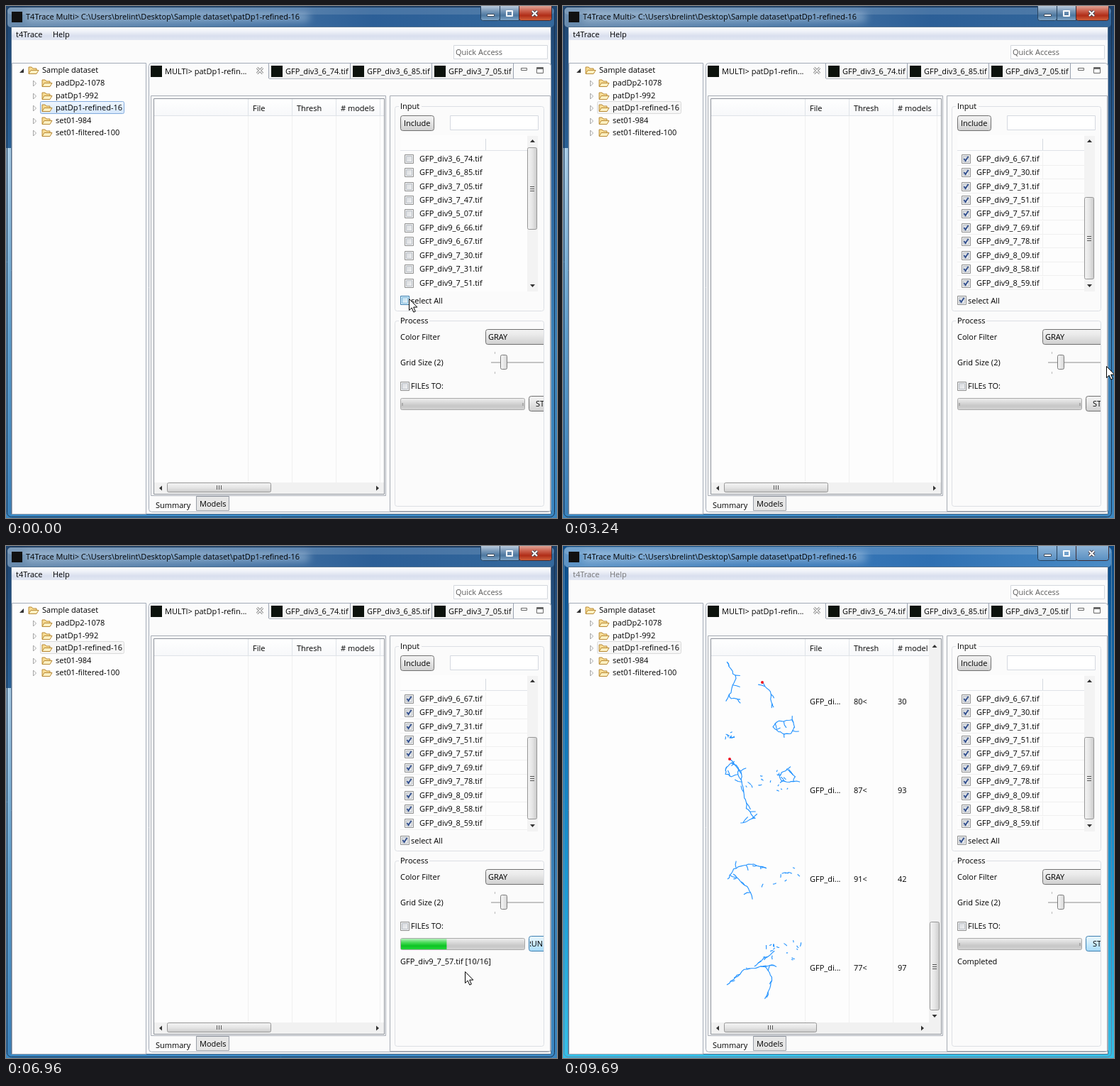
Recreate the animation shown at these times as an HTML page with a canvas. Size 777 px wide and 721 px high, loop 9720 ms.

```html
<!DOCTYPE html>
<html lang="en">
<head>
<meta charset="utf-8">
<title>T4Trace Multi</title>
<style>
html, body { margin: 0; width: 100%; height: 100%; overflow: hidden; background: #fbfbfb; }
canvas { display: block; }
</style>
</head>
<body>
<canvas id="stage" width="777" height="721"></canvas>
<script>
const c = document.getElementById('stage').getContext('2d');
const LOOP = 9720, STEP = 133;
const FONT = '11px "Open Sans", "Noto Sans", sans-serif';
const BLUE = '#1e90ff';

// Moments of the story, in ms
const SELECT = 420, DRAG = 1320, DROP = 1800, HOVER_START = 5150, RUN = 5440, DONE = 7200,
  FILL = 7350, WHEEL = 8430, IDLE = 9690;

// Pointer stops: time, x, y
const stops = [[0, 568, 412], [SELECT, 568, 412], [1330, 747, 281], [1590, 753, 340], [1890, 753, 340],
  [2390, 706, 469], [2820, 764, 480], [3240, 766, 510], [4220, 592, 546], [4500, 592, 546],
  [5290, 755, 560], [6290, 740, 580], [6910, 647, 599], [7780, 633, 600], [8370, 449, 370], [LOOP, 449, 370]];

const files = '3_6_74 3_6_85 3_7_05 3_7_47 9_5_07 9_6_66 9_6_67 9_7_30 9_7_31 9_7_51 9_7_57 9_7_69 9_7_78 9_8_09 9_8_58 9_8_59'
  .split(' ').map(s => `GFP_div${s}.tif`);

// Key points of the traced cells; knots and specks are x, y, radius
const traces = {
  3: { thresh: 74, models: 8, strands: ['43,78 30,52 16,46', '43,78 61,84 93,97'], knots: [[69, 42, 8]], dot: true },
  4: { thresh: 77, models: 7, strands: ['58,41 68,60 77,79 88,84'], knots: [[61, 66, 9]] },
  5: { thresh: 75, models: 54, strands: ['106,20 112,43 102,64 87,67', '15,53 36,62 72,54'], knots: [[48, 67, 13]], specks: [30, 12, 28] },
  6: { thresh: 74, models: 115, strands: ['90,64 117,69', '90,64 61,70 36,86 11,88', '90,64 75,56 79,30'], knots: [[56, 50, 18]], specks: [78, 108, 28], dot: true },
  12: { thresh: 80, models: 30, strands: ['17,7 30,30 20,57 35,61', '67,36 78,49 81,73'], knots: [[98, 99, 14]], specks: [21, 110, 7], dot: true },
  13: { thresh: 87, models: 93, strands: ['21,19 36,36 45,88 56,102 36,110'], knots: [[24, 34, 10], [102, 44, 11]], specks: [74, 50, 30], dot: true },
  14: { thresh: 91, models: 42, strands: ['18,62 26,48 48,40 74,46', '26,55 48,76 54,91'], specks: [92, 58, 28] },
  15: { thresh: 77, models: 97, strands: ['17,86 41,65 71,59 88,60', '71,60 81,76 74,103', '56,60 84,38'], specks: [96, 38, 26] }
};

function random(seed) {
  let s = seed * 7919 + 17;
  return () => (s = (s * 16807) % 2147483647) / 2147483647;
}

const clamp = (v, lo, hi) => Math.max(lo, Math.min(hi, v));

function rect(x, y, w, h, fill, stroke, r = 0) {
  const inset = stroke ? .5 : 0;
  c.beginPath();
  c.roundRect(x + inset, y + inset, w - 2 * inset, h - 2 * inset, r);
  if (fill) { c.fillStyle = fill; c.fill(); }
  if (stroke) { c.strokeStyle = stroke; c.lineWidth = 1; c.stroke(); }
}

function shade(x0, y0, x1, y1, ...colors) {
  const g = c.createLinearGradient(x0, y0, x1, y1);
  colors.forEach((s, i) => g.addColorStop(i / (colors.length - 1), s));
  return g;
}
const down = (y, h, ...colors) => shade(0, y, 0, y + h, ...colors);
const across = (x, w, ...colors) => shade(x, 0, x + w, 0, ...colors);

function text(s, x, mid, color = '#000') {
  c.fillStyle = color;
  c.fillText(s, x, mid + 4);
}

function clip(x, y, w, h, draw) {
  c.save();
  c.beginPath();
  c.rect(x, y, w, h);
  c.clip();
  draw();
  c.restore();
}

function poly(points, fill, stroke, width = 1) {
  c.beginPath();
  points.forEach(([x, y], i) => i ? c.lineTo(x, y) : c.moveTo(x, y));
  if (fill) { c.closePath(); c.fillStyle = fill; c.fill(); }
  if (stroke) { c.strokeStyle = stroke; c.lineWidth = width; c.stroke(); }
}

function disc(x, y, r, fill, stroke) {
  c.beginPath();
  c.arc(x, y, r, 0, 7);
  if (fill) { c.fillStyle = fill; c.fill(); }
  if (stroke) { c.strokeStyle = stroke; c.lineWidth = 1; c.stroke(); }
}

function cross(x, y, size, outline, fill, width) {
  for (const [w, color] of [[width + 2, outline], [width, fill]]) {
    poly([[x, y], [x + size, y + size]], null, color, w);
    poly([[x + size, y], [x, y + size]], null, color, w);
  }
}

function arrow(x, y, dx, dy) {
  poly([[x + dx * 2, y + dy * 2], [x - dx * 2 + dy * 3.5, y - dy * 2 + dx * 3.5],
    [x - dx * 2 - dy * 3.5, y - dy * 2 - dx * 3.5]], '#333');
}

function button(x, y, w, h, hot) {
  const fill = hot ? down(y, h, '#eaf6fd', '#d9f0fc', '#bee6fd', '#a7d9f5')
    : down(y, h, '#f3f3f3', '#ebebeb', '#dddddd', '#cfcfcf');
  rect(x, y, w, h, fill, hot ? '#3c7fb1' : '#707070', 3);
}

function checkbox(x, mid, checked, hot) {
  const y = Math.round(mid - 6.5);
  rect(x, y, 13, 13, hot ? '#def2fb' : '#f4f4f4', hot ? '#3c7fb1' : '#8e8f8f');
  rect(x + 2, y + 2, 9, 9, shade(x, y, x + 12, y + 12, hot ? '#a9d8f2' : '#cfd3d8', '#f6f6f6'), hot ? '#7fb9dc' : '#b9bfc6');
  if (checked) poly([[x + 3.5, y + 6], [x + 5.5, y + 9], [x + 9.5, y + 3]], null, '#33508e', 2);
}

const GRAY = ['#f5f5f5', '#e6e6e6', '#c9c9c9'], AQUA = ['#cdeafb', '#9bd7f8', '#5fbdec'];

function vThumb(x, y, h, hot) {
  rect(x, y, 14, h, across(x, 14, ...(hot ? AQUA : GRAY)), hot ? '#3c7fb1' : '#979797', 2);
  for (let i = -1; i < 2; i++) rect(x + 4, Math.round(y + h / 2) + i * 3, 6, 1, '#555');
}

function hThumb(x, y, w) {
  rect(x, y, w, 14, down(y, 14, ...GRAY), '#979797', 2);
  for (let i = -1; i < 2; i++) rect(Math.round(x + w / 2) + i * 3 - 1, y + 4, 1, 6, '#555');
}

function group(label, y, h, w) {
  rect(548, y, 211, h, null, '#dcdfe4', 3);
  rect(554, y - 2, w, 5, '#fbfbfb');
  text(label, 556, y);
}

function drawFrame(idle) {
  rect(0, 0, 777, 721, idle ? down(0, 721, '#0c4a86', '#1272b4', '#1c9ad4', '#36bfe6')
    : down(0, 721, '#1d436e', '#2c659c', '#3c83ba', '#3a86c0'));
  if (!idle) rect(0, 200, 7, 515, down(200, 515, '#a9cbe4', '#5f9dca', '#3a7fb8'));
  rect(1, 1, 773, 719, null, idle ? '#5f87a8' : '#1b3350', 6);
  rect(2, 2, 771, 28, idle ? across(0, 777, '#5f95c6', '#3f7dba', '#2f70b2', '#4a8cc6')
    : across(0, 777, '#6a8cae', '#4f7ba8', '#2c5f97', '#34689c'), null, 5);
  rect(2, 2, 771, 10, 'rgba(255,255,255,.13)', null, 5);
  c.save();
  c.filter = 'blur(6px)';
  rect(26, 9, 402, 13, 'rgba(214,230,245,.45)', null, 6);
  c.restore();
  text('T4Trace Multi> C:\\Users\\brelint\\Desktop\\Sample dataset\\patDp1-refined-16', 28, 15);
  rect(8, 8, 15, 15, '#111');

  const glass = idle ? down(0, 20, '#8fb5d8', '#5a90c2') : down(0, 20, '#b9cbdd', '#7d9cbb', '#4c779f', '#7ea4c6');
  const red = down(0, 20, '#dfa295', '#cc6350', '#b02d17', '#d0603c');
  rect(669, -3, 28, 24, glass, '#27435f', 3);
  rect(696, -3, 28, 24, glass, '#27435f');
  rect(723, -3, 47, 24, idle ? glass : red, '#3f2e35', 3);
  rect(678, 11, 11, 4, '#fff', '#3c4a5c');
  rect(705, 6, 10, 9, null, '#fff');
  rect(706, 7, 8, 7, null, '#fff');
  cross(742, 7, 7, '#4b4550', '#fff', 2.2);

  rect(7, 29, 762, 687, '#fbfbfb', '#51708f');
  rect(8, 30, 760, 18, down(30, 18, '#fdfdfe', '#eef1f8', '#d9dfee', '#e2e7f3'));
  text('t4Trace', 14, 40, idle ? '#777' : '#000');
  text('Help', 66, 40, idle ? '#777' : '#000');
  rect(631, 55, 133, 20, '#fff', '#d3d7dd');
  text('Quick Access', 634, 65, '#5a5a5a');
}

function folder(x, y) {
  poly([[x + 1, y + 10], [x + 1, y + 1], [x + 5, y + 1], [x + 7, y + 3], [x + 12, y + 3], [x + 12, y + 10]], '#f7dc95', '#b98a35');
  poly([[x + 1, y + 10.5], [x + 4, y + 5.5], [x + 15, y + 5.5], [x + 12, y + 10.5], [x + 1, y + 10.5]], '#fdf0c2', '#b98a35');
}

function drawTree(focused) {
  rect(8, 80, 190, 636, '#fdfdfd', '#a3abb8');
  poly([[19, 94], [25, 94], [25, 88]], '#333');
  folder(31, 85);
  text('Sample dataset', 51, 90);
  ['padDp2-1078', 'patDp1-992', 'patDp1-refined-16', 'set01-984', 'set01-filtered-100'].forEach((s, i) => {
    const y = Math.round(108 + i * 17.5);
    if (i === 2) rect(48, 134, 119, 18, focused ? down(134, 18, '#f0f7fe', '#d4e6fb') : '#f6f6f6', focused ? '#84acdd' : '#dadada', 2);
    poly([[38.5, y - 3], [42.5, y + 1], [38.5, y + 5], [38.5, y - 3]], '#fff', '#a5a5a5');
    folder(50, y - 5);
    text(s, 70, y);
  });
}

function drawTabs() {
  rect(201, 80, 568, 633, '#fbfbfb', '#a3abb8', 4);
  rect(371, 81, 344, 21, down(81, 21, '#fdfdfd', '#f0f0f0'));
  rect(371, 102, 397, 1, '#b4bac4');
  ['MULTI> patDp1-refin...', ...files.slice(0, 3)].forEach((label, i) => {
    const x = i ? 259 + i * 115 : 204;
    rect(x, 84, 16, 16, '#0c120c');
    text(label, x + 20, 92);
    rect(370 + i * 115, 81, 1, 21, '#9aa2b0');
  });
  cross(354, 87, 8, '#8a8a8a', '#fff', 1.2);
  rect(726, 87, 9, 4, '#fff', '#666');
  rect(748, 86, 10, 9, '#fff', '#666');
  rect(748, 87, 10, 2, '#666');
}

// Wavy stroke through the points, with short side twigs
function neurite(points, rnd) {
  const line = [points[0]];
  for (let i = 1; i < points.length; i++) {
    const [ax, ay] = points[i - 1], [bx, by] = points[i];
    const n = Math.ceil(Math.hypot(bx - ax, by - ay) / 4);
    for (let k = 1; k <= n; k++) {
      line.push([ax + (bx - ax) * k / n + rnd() * 2 - 1, ay + (by - ay) * k / n + rnd() * 2 - 1]);
    }
  }
  poly(line, null, BLUE, 1.1);
  line.forEach(([x, y], i) => {
    if (i % 4 === 2) twig(x, y, 5 + rnd() * 6, rnd);
  });
}

function twig(x, y, length, rnd) {
  const a = rnd() * 6.28, b = a + rnd() - .5, h = length / 2;
  const mx = x + Math.cos(a) * h, my = y + Math.sin(a) * h;
  poly([[x, y], [mx, my], [mx + Math.cos(b) * h, my + Math.sin(b) * h]], null, BLUE, 1.1);
}

function knot([x, y, r], rnd) {
  const ring = Array.from({ length: 9 }, (_, i) => {
    const a = i % 8 * Math.PI / 4, d = r * (i % 8 ? .7 + rnd() * .5 : 1);
    return [x + Math.cos(a) * d, y + Math.sin(a) * d * .8];
  });
  neurite(ring, rnd);
}

const rowInfo = row => traces[row] || {
  thresh: 72 + row * 5 % 18, models: 9 + row * 23 % 80,
  strands: [`${15 + row * 3},30 45,60 ${60 + row * 4},95`], knots: [[80, 40, 10]], specks: [60, 60, 45]
};

function drawCell(row, x, y) {
  const { strands, knots = [], specks, models, dot } = rowInfo(row), rnd = random(row + 1);
  const lines = strands.map(s => s.split(' ').map(p => p.split(',').map(Number)));
  c.save();
  c.translate(x, y);
  lines.forEach(line => neurite(line, rnd));
  knots.forEach(k => knot(k, rnd));
  if (specks) {
    const [sx, sy, r] = specks;
    for (let i = 0; i < 4 + models / 8; i++) {
      twig(sx + (rnd() * 2 - 1) * r, sy + (rnd() - .5) * r, 2 + rnd() * 4, rnd);
    }
  }
  if (dot) disc(...lines[lines.length - 1][0], 2, '#f01020');
  c.restore();
}

function drawTable(t) {
  const bar = t >= DONE, right = bar ? 516 : 533;
  const top = clamp(3 + 3 * Math.floor((t - WHEEL) / 410), 0, 12);
  rect(204, 126, 332, 564, '#fbfbfb', '#a6abb4');
  rect(208, 130, 326, 558, '#fdfdfd', '#8e939b');
  rect(209, 131, right - 209, 23, down(131, 23, '#fff', '#f7f8fa'));
  rect(209, 154, right - 209, 1, '#dfe3e8');
  for (let x = 341; x < right; x += 62) {
    rect(x, 131, 1, 23, '#dfe3e8');
    rect(x, 155, 1, 516, '#f0f0f0');
  }
  const row = (cells, mid) => cells.forEach((s, i) => text(s, 348 + i * 62, mid));
  clip(209, 131, right - 210, 540, () => {
    row(['File', 'Thresh', '# models'], 144);
    for (let i = 0; i < 4 && t >= FILL; i++) {
      const { thresh, models } = rowInfo(top + i);
      drawCell(top + i, 214, Math.round(156 + i * 125.4));
      row(['GFP_di...', thresh + '<', models], Math.round(218.5 + i * 125.3));
    }
  });
  rect(209, 671, 324, 16, '#f1f1f1');
  arrow(218, 679, -1, 0);
  arrow(bar ? 507 : 524, 679, 1, 0);
  hThumb(227, 671, bar ? 131 : 147);
  if (bar) {
    rect(516, 131, 17, 540, '#f1f1f1');
    arrow(524, 141, 0, -1);
    arrow(524, 662, 0, 1);
    vThumb(517, Math.round(149 + top * 31.7), 125);
  }
  text('Summary', 211, 703);
  rect(268, 690, 47, 21, '#e6e6e6', '#9aa0a8');
  text('Models', 273, 701);
}

function drawInput(t, pointerY) {
  const checked = t >= SELECT, drag = t >= DRAG && t < DROP;
  const thumb = t < DRAG ? 199 : drag ? clamp(pointerY - 60, 199, 269) : 269;
  const first = Math.round((thumb - 199) / 70 * 6);
  group('Input', 141, 289, 32);
  button(556, 154, 48, 22);
  text('Include', 561, 165);
  rect(626, 154, 125, 21, '#fff', '#d5d9e0');
  rect(556, 182, 179, 220, '#fdfdfd');
  rect(556, 203, 179, 1, '#dfe3e8');
  rect(676, 187, 1, 16, '#d5dae0');
  for (let i = 0; i < 10; i++) {
    const mid = Math.round(214.6 + i * 19.45);
    if (checked) {
      rect(556, mid + 9, 179, 1, '#f0f0f0');
      rect(676, mid - 9, 1, 19, '#f0f0f0');
    }
    checkbox(562, mid + .5, checked);
    text(files[first + i], 583, mid);
  }
  rect(735, 183, 15, 219, '#f3f3f3');
  if (drag) for (const y of [183, 387]) rect(735, y, 14, 15, '#eee', '#b5b5b5', 2);
  arrow(742.5, 190, 0, -1);
  arrow(742.5, 394, 0, 1);
  vThumb(735, thumb, 116, drag);
  checkbox(556, 414.5, checked, !checked);
  text('select All', 571, 415);
}

function drawProcess(t, x, y) {
  const running = t >= RUN && t < DONE;
  const overCombo = x > 676 && x < 758 && y > 455 && y < 477;
  group('Process', 443, 262, 43);
  text('Color Filter', 556, 466);
  text('Grid Size (2)', 556, 502);
  checkbox(556, 535.5, false);
  text('FILEs TO:', 571, 535);
  clip(548, 443, 210, 262, () => {
    button(676, 455, 110, 22, overCombo);
    text('GRAY', 680, 466);
    rect(684, 501, 80, 2, '#c4c4c4');
    for (const tick of [487, 515]) rect(689, tick, 1, 3, '#bbb');
    rect(697, 491, 10, 21, across(697, 10, '#fafafa', '#d5d5d5'), '#7c7c7c', 2);
    button(737, 549, 52, 22, t >= HOVER_START);
  });
  clip(739, 549, 19, 22, () => text(running ? 'RUNNING' : 'START', running ? 734 : 747, 560));

  rect(556, 552, 176, 17, down(552, 17, '#f2f2f2', '#dcdcdc', '#c6c6c6', '#d6d6d6'), '#a9a9a9', 2);
  const fill = running ? Math.max(0, t - 6290) * .096 : 0;
  if (fill) rect(557, 553, fill, 15, down(553, 15, '#b5f0bd', '#4fdc5e', '#0cc423', '#25d43b'));
  else for (const notch of [558, 728]) rect(notch, 559, 2, 4, '#aaa');
  const n = 1 + Math.floor((t - RUN) / 168);
  if (running) text(`${files[n]} [${n}/16]`, 556, 585);
  if (t >= DONE) text('Completed', 556, 585);
}

function drawPointer(t, x, y) {
  const pressed = [[SELECT, 100], [DRAG, 280], [RUN, 120]].some(([from, span]) => t >= from && t < from + span);
  if (pressed) disc(x + 1, y, 10, null, '#222');
  const shape = [[0, 0], [0, 16], [3.7, 12.6], [6.3, 18.6], [8.8, 17.5], [6.2, 11.6], [11.3, 11.6], [0, 0]];
  poly(shape.map(([a, b]) => [x + a + .5, y + b + .5]), '#fff', '#000');
}

function pointerAt(t) {
  const T = Math.floor(t / STEP) * STEP;
  const i = stops.findIndex(s => s[0] > T);
  const [a, ax, ay] = stops[i - 1], [b, bx, by] = stops[i];
  const k = (T - a) / (b - a);
  return [Math.round(ax + (bx - ax) * k), Math.round(ay + (by - ay) * k)];
}

function draw(t) {
  const [x, y] = pointerAt(t), idle = t >= IDLE - 5;
  c.font = FONT;
  c.clearRect(0, 0, 777, 721);
  drawFrame(idle);
  drawTree(t < SELECT);
  drawTabs();
  drawTable(t);
  rect(541, 126, 227, 586, '#fbfbfb', '#a6abb4');
  drawInput(t, y);
  drawProcess(t, x, y);
  if (!idle) drawPointer(t, x, y);
}

const start = performance.now();
function loop() {
  draw((performance.now() - start) % LOOP);
  requestAnimationFrame(loop);
}
loop();
</script>
</body>
</html>
```
